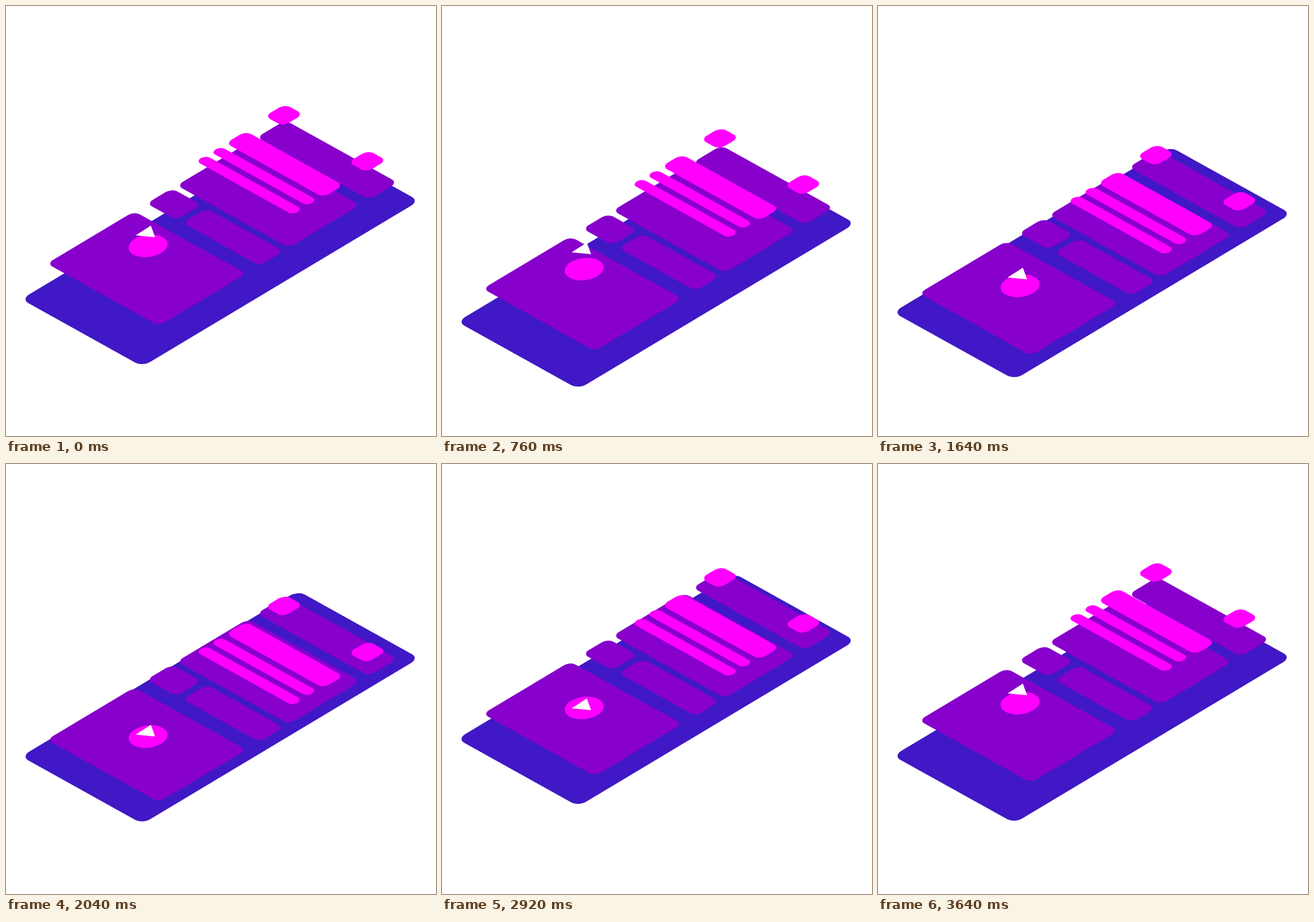
These frames come from a looping animation (748 by 748 pixels, 3.68 s). An HTML page with a canvas:

```html
<!DOCTYPE html>
<html lang="en">
<head>
<meta charset="utf-8">
<title>Floating isometric layers</title>
<style>
  html, body { margin: 0; width: 100%; height: 100%; overflow: hidden; background: #fff; }
  canvas { display: block; }
</style>
</head>
<body>
<canvas id="stage" width="748" height="748"></canvas>
<script>
const ctx = document.getElementById('stage').getContext('2d');
const LOOP = 3680, STEP = 40, TRAVEL = 75;

// Isometric axes: U runs down-right, V runs up-right.
const U = [0.94, 0.94 * 0.556];
const V = [1.056, -1.056 * 0.599];

function onPlane(x, y, addPath) {
  ctx.save();
  ctx.transform(...U, ...V, x, y);
  ctx.beginPath();
  addPath();
  ctx.restore();
  ctx.fill();
}

// Rounded panel given by its visible left tip, bottom tip x and right tip x.
function panel(leftX, leftY, bottomX, rightX, r = 10) {
  const inset = r * (U[0] + V[0] - Math.hypot(U[0], V[0]));
  const x = leftX - inset;
  const corner = bottomX + 0.1 * r;
  const w = (corner - x) / U[0];
  const h = (rightX + inset - corner) / V[0];
  onPlane(x, leftY, () => ctx.roundRect(0, 0, w, h, r));
}

function base() {
  panel(34, 510, 236, 711, 13);
}

function cards() {
  panel(77, 448, 265, 412);
  panel(250.5, 343.5, 295, 334);
  panel(313, 377.3, 440, 477);
  panel(303, 312, 491, 610);
  panel(442, 228.5, 630, 675);
}

function details() {
  panel(456, 191.5, 481, 511);
  panel(601, 271.7, 626, 656);
  panel(388, 238.5, 551, 581);
  panel(361, 254.4, 523, 536, 8);
  panel(335, 269.8, 498, 511, 8);
  onPlane(247.2, 417.2, () => ctx.arc(0, 0, 24, 0, 2 * Math.PI));
}

function playMark() {
  ctx.beginPath();
  ctx.moveTo(225.5, 399);
  ctx.lineTo(252, 382);
  ctx.lineTo(259.3, 402.3);
  ctx.fill();
}

// lead: time in ms since the layer left its highest point when the loop begins.
const layers = [
  { color: '#4018c5', lead: 830, draw: base },
  { color: '#8800cc', lead: 550, draw: cards },
  { color: '#ff00ff', lead: 290, draw: details },
  { color: '#ffffff', lead: 30, draw: playMark },
];

// Eased drop and rise, each taking half a loop.
function drop(time) {
  const phase = 2 * (time % LOOP) / LOOP;
  const s = 1 - Math.abs(1 - phase);
  return TRAVEL * s * s * (3 - 2 * s);
}

function render(now) {
  const time = Math.floor((now % LOOP) / STEP) * STEP;
  ctx.fillStyle = '#fff';
  ctx.fillRect(0, 0, 748, 748);
  for (const { color, lead, draw } of layers) {
    ctx.save();
    ctx.translate(0, drop(time + lead) - drop(lead));
    ctx.fillStyle = color;
    draw();
    ctx.restore();
  }
}

const start = performance.now();
function tick() {
  render(performance.now() - start);
  requestAnimationFrame(tick);
}
tick();
</script>
</body>
</html>
```
